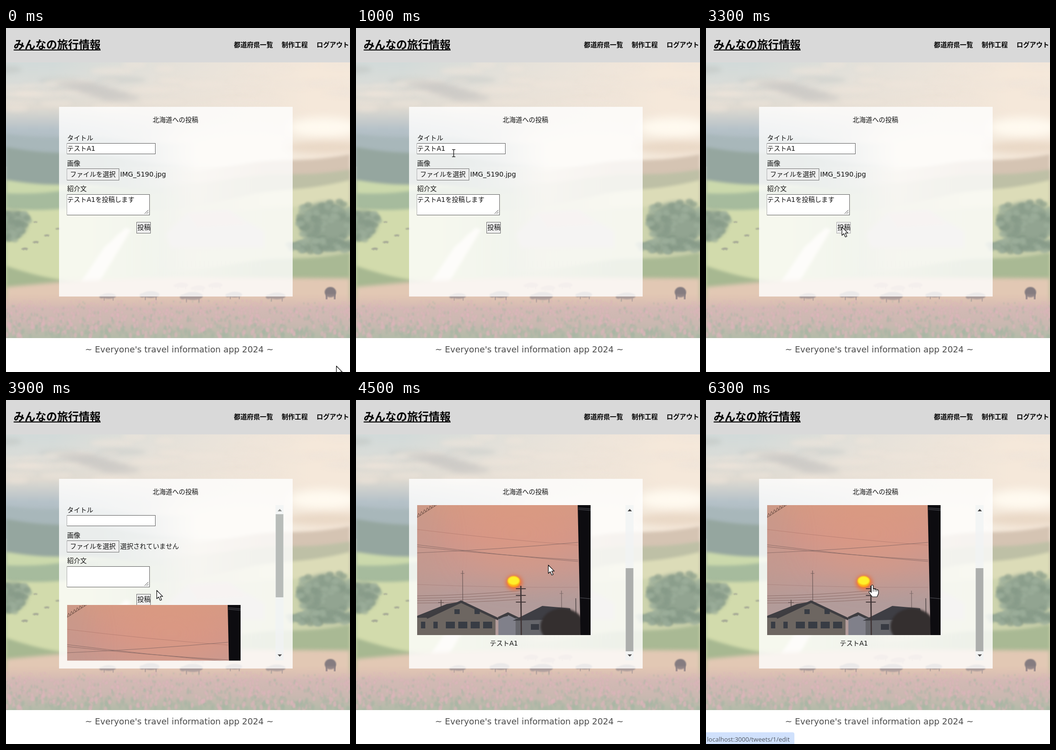
Recreate the animation shown at these times as an HTML page with a canvas. Size 720 by 720 pixels, loop 7.2 s.

```html
<!DOCTYPE html>
<html lang="ja">
<head>
<meta charset="utf-8">
<title>みんなの旅行情報</title>
<style>
html, body { margin: 0; width: 100%; height: 100%; overflow: hidden; background: #fff; }
canvas { display: block; width: 720px; height: 720px; }
</style>
</head>
<body>
<canvas id="stage" width="720" height="720"></canvas>
<script>
const LOOP = 7200, STEP = 100;
const POSTED = 3700, SCROLL_AT = 4300, SCROLL_TIME = 200, HOVER = 5000, STATUS = 6000;
const SCROLL = 209, SIZE = 13.65;
const FONT = '"DejaVu Sans", "Noto Sans CJK JP", sans-serif';
const ctx = document.getElementById('stage').getContext('2d');

function layer(w, h, paint) {
  const c = document.createElement('canvas');
  c.width = w;
  c.height = h;
  paint(c.getContext('2d'));
  return c;
}

function random(seed) {
  return () => (seed = (seed * 16807) % 2147483647) / 2147483647;
}

// Evenly spaced colours from (x0, y0) to (x1, y1)
function gradient(g, x0, y0, x1, y1, ...colors) {
  const f = g.createLinearGradient(x0, y0, x1, y1);
  colors.forEach((c, i) => f.addColorStop(i / (colors.length - 1), c));
  return f;
}

function soft(g, blur, paint) {
  g.filter = blur ? `blur(${blur}px)` : 'none';
  paint();
  g.filter = 'none';
}

function poly(g, pts, fill, blur = 0) {
  g.fillStyle = fill;
  g.beginPath();
  for (let i = 0; i < pts.length; i += 2) g.lineTo(pts[i], pts[i + 1]);
  soft(g, blur, () => g.fill());
}

function blob(g, x, y, rx, ry, fill, blur = 0) {
  g.fillStyle = fill;
  g.beginPath();
  g.ellipse(x, y, rx, ry, 0, 0, 7);
  soft(g, blur, () => g.fill());
}

function line(g, pts, color, width = 1) {
  g.strokeStyle = color;
  g.lineWidth = width;
  g.beginPath();
  for (let i = 0; i < pts.length; i += 2) g.lineTo(pts[i], pts[i + 1]);
  g.stroke();
}

function rect(g, x, y, w, h, fill) {
  g.fillStyle = fill;
  g.fillRect(x, y, w, h);
}

function text(g, s, x, y, size = SIZE, color = '#111', weight = '', font = FONT) {
  g.font = `${weight} ${size}px ${font}`;
  g.fillStyle = color;
  g.fillText(s, x, y);
}

function paintSky(g, rnd) {
  rect(g, 0, 72, 720, 230, gradient(g, 0, 72, 0, 260, '#d2dad9', '#dadcd8', '#dfdad1', '#b5c1c8', '#a9b7bb'));
  rect(g, 0, 72, 720, 230, gradient(g, 100, 0, 640, 0, '#f2e6da00', '#efe5dab0', '#f5e8da'));
  for (let i = 0; i < 45; i++) {
    const x = rnd() * 720, y = 74 + rnd() * 95;
    const tint = x < 330 && i % 3 === 0 ? '#c3c7c666' : '#f1e6da77';
    blob(g, x, y, 20 + rnd() * 40, 3 + rnd() * 6, tint, 4);
  }
  for (let i = 0; i < 5; i++) blob(g, 150 + i * 22, 118 + i * 7, 42, 8, '#c6c4c077', 5);
  blob(g, 470, 260, 150, 60, '#f7eedf', 30);
  blob(g, 665, 208, 75, 20, '#fffaf0', 10);
  blob(g, 670, 250, 90, 12, '#e9d8c6', 7);
}

// Rolling ground that fades out from one side of the stage to the middle
function ridge(g, side, y, slope, color) {
  const edge = side < 0 ? 0 : 720;
  const pts = [edge, 650];
  for (let d = 0; d <= 400; d += 20) pts.push(edge - side * d, y + slope * d + 3 * Math.sin(d / 40));
  pts.push(edge - side * 400, 650);
  poly(g, pts, gradient(g, edge - side * 180, 0, edge - side * 400, 0, color, color + '00'), 3);
}

function paintLand(g) {
  rect(g, 0, 290, 720, 260, gradient(g, 0, 290, 0, 540, '#eee5d5', '#e2e2c8', '#cfd4b2'));
  ridge(g, -1, 222, 0.05, '#a8b7ba');
  ridge(g, -1, 249, 0.1, '#95a69f');
  ridge(g, -1, 318, 0.08, '#cbd9ac');
  ridge(g, -1, 346, -0.05, '#a6bb9d');
  ridge(g, -1, 378, 0, '#d2dbac');
  ridge(g, -1, 498, 0.25, '#a7b891');
  ridge(g, 1, 264, 0.1, '#d5c4b3');
  ridge(g, 1, 296, 0.08, '#bec0a6');
  ridge(g, 1, 318, 0.16, '#dcdcb8');
  ridge(g, 1, 362, 0.1, '#cdd3ad');
  ridge(g, 1, 470, 0.1, '#a9b994');
  poly(g, [155, 535, 205, 460, 250, 418, 262, 422, 190, 540], '#f7f2e6', 3);
  poly(g, [335, 430, 380, 388, 465, 382, 540, 425, 540, 460, 345, 460], '#cfc8c5', 4);
  poly(g, [400, 418, 380, 388, 465, 382, 505, 412], '#d6c6bf', 2);
  for (let x = 325; x < 535; x += 9) line(g, [x, 488, x, 500], '#bfc2aa');
}

function tree(g, rnd, x, y, rx, ry) {
  blob(g, x, y, rx * 0.85, ry * 0.85, '#92a491', 4);
  for (let i = 0; i < rx; i++) {
    const a = rnd() * 6.3, r = Math.sqrt(rnd());
    blob(g, x + Math.cos(a) * r * rx, y + Math.sin(a) * r * ry, 8, 6, i % 2 ? '#879a88aa' : '#9cae9aaa', 2);
  }
}

function cow(g, x, y, s, color) {
  blob(g, x, y, s, s * 0.4, color, 1);
  blob(g, x - s, y + s * 0.1, s * 0.3, s * 0.25, color, 1);
  for (const leg of [-0.7, 0.55]) rect(g, x + leg * s, y, s * 0.13, s * 0.65, color);
}

function paintMeadow(g, rnd) {
  poly(g, [0, 542, 130, 530, 350, 522, 720, 524, 720, 648, 0, 648], '#e2c8b4', 4);
  for (let i = 0; i < 5; i++) cow(g, 215 + i * 88, 561 - i % 2 * 3, 15 + i % 3 * 3, '#999091');
  for (let i = 0; i < 3; i++) cow(g, 368 + i * 36, 538 + i % 2 * 6, 13, '#c9afa5');
  blob(g, 679, 553, 12, 11, '#857c80', 1);
  for (const x of [669, 686]) rect(g, x, 553, 4, 15, '#857c80');
  for (let i = 0; i < 5; i++) cow(g, 40 + i * 23 % 70, 462 - i * 14, 6 - i * 0.6, '#a5a896');
  rect(g, 0, 555, 720, 94, gradient(g, 0, 555, 0, 648, '#dcbcb000', '#d3b9b4', '#cbb8b1', '#b4bba9'));
  for (let i = 0; i < 900; i++) {
    const d = rnd(), pink = rnd() > 0.1 + d * 0.5;
    blob(g, rnd() * 720, 570 + d * 78, 1.5 + d * 2, 2 + d * 4, pink ? '#deb5bb90' : '#a6b6a370', 1);
  }
}

function paintPage(g) {
  const rnd = random(77);
  rect(g, 0, 0, 720, 720, '#fff');
  g.save();
  g.beginPath();
  g.rect(0, 72, 720, 577);
  g.clip();
  paintSky(g, rnd);
  paintLand(g);
  tree(g, rnd, 14, 410, 36, 34);
  tree(g, rnd, 670, 410, 66, 54);
  tree(g, rnd, 665, 455, 75, 14);
  paintMeadow(g, rnd);
  g.restore();
  rect(g, 0, 0, 720, 72, '#d9d9d9');
  rect(g, 111, 165, 489, 397, 'rgba(255,255,255,.8)');
  text(g, 'みんなの旅行情報', 16, 42.5, 22.75, '#000', 'bold');
  rect(g, 16, 45, 182, 2, '#000');
  text(g, '都道府県一覧', 477, 40, SIZE, '#000', 'bold');
  text(g, '制作工程', 577, 40, SIZE, '#000', 'bold');
  text(g, 'ログアウト', 650, 40, SIZE, '#000', 'bold');
  text(g, '北海道への投稿', 307, 197);
  text(g, "~ Everyone's travel information app 2024 ~", 165.5, 679, 17.8, '#4b4b4b');
}

function wire(g, y0, y1, end = 337, color = '#8d6c68') {
  g.strokeStyle = color;
  g.lineWidth = 0.9;
  g.beginPath();
  g.moveTo(0, y0);
  g.quadraticCurveTo(end / 2, (y0 + y1) / 2 + 4, end, y1);
  g.stroke();
}

// Mast with crossbars
function mast(g, x, y, bars, color, width) {
  line(g, [x, y, x + 1, 272], color, width);
  for (let i = 0; i < bars; i++) {
    const r = width * 4, h = y + 6 + i * 14;
    line(g, [x - r, h, x + r, h], color, width * 0.7);
  }
}

function gable(g, cx, peak, half, back, wall) {
  const eave = peak + half * 0.47, left = cx - half - back;
  poly(g, [left, eave, cx, peak, cx + half, eave, cx + half, 272, left, 272], wall);
  poly(g, [left, eave, cx - back, peak + 5, cx, peak, cx - half, eave], '#3f3e42');
  line(g, [cx - half, eave, cx, peak, cx + half + 6, eave + 3], '#3e3d41', 5);
}

// Sunset picture, 363 x 272
function paintPhoto(g) {
  rect(g, 0, 0, 363, 272, gradient(g, 0, 0, 0, 272, '#d69a84', '#d3978a', '#c79a92', '#b29c9b', '#b29c9b'));
  blob(g, 215, 60, 110, 90, '#e2987d66', 35);
  blob(g, 0, 90, 50, 130, '#b99a9066', 25);

  wire(g, 51, 84, 337, '#b98174');
  wire(g, 83, 118);
  wire(g, 87, 115);
  wire(g, 100, 78);
  wire(g, 166, 172, 337, '#ac8682');
  for (let i = 0; i < 4; i++) wire(g, 190 + i * 5, 179 + i * 6, 217);
  for (let x = 0; x < 42; x += 6) {
    const y = 26 - x * 0.64;
    line(g, [x, y, x + 3, y - 9, x + 6, y - 4, x, y], '#75564b');
  }

  blob(g, 203, 162, 17, 15, '#ee6b35', 4);
  blob(g, 202, 160, 13.5, 11.5, '#ffad18', 1);
  blob(g, 202, 158, 12, 9, '#fff02a', 1);

  mast(g, 95, 137, 1, '#5d4d4c', 1);
  mast(g, 302, 179, 1, '#6d5c5c', 1);
  mast(g, 50, 198, 1, '#5d4d4c', 1.5);
  mast(g, 332, 195, 0, '#554b4b', 1.5);

  gable(g, 190, 227, 20, 0, '#80808a');
  gable(g, 92, 202, 72, 30, '#6d6661');
  for (let i = 0; i < 6; i++) rect(g, 8 + i * 26, 244, i < 2 ? 9 : 19, 14, '#383c44');
  for (const x of [78, 120]) rect(g, x, 218, 11, 10, '#383c44');
  rect(g, 206, 236, 110, 36, '#66666b');
  poly(g, [200, 242, 262, 211, 320, 216, 325, 238], '#3e3e44');
  rect(g, 238, 249, 17, 12, '#383b43');
  blob(g, 304, 254, 46, 38, '#342f2f', 2);
  mast(g, 217, 169, 3, '#3f3435', 2.6);

  poly(g, [336, 0, 363, 0, 363, 272, 342, 272], '#0d0c10');
  for (const y of [6, 9, 194]) line(g, [337 + y / 45, y, 363, y + 2], '#55565d');
}

const page = layer(720, 720, paintPage);
const photo = layer(363, 272, paintPhoto);

function box(x, y, w, h, fill, border) {
  rect(ctx, x, y, w, h, fill);
  ctx.strokeStyle = border;
  ctx.lineWidth = 1;
  ctx.strokeRect(x + 0.5, y + 0.5, w - 1, h - 1);
}

function drawForm(posted, hot) {
  text(ctx, 'タイトル', 128, 235);
  box(127, 241, 186, 23, '#fff', '#626262');
  text(ctx, '画像', 128, 288);
  box(127, 294, 110, 25, '#efefef', '#767676');
  text(ctx, 'ファイルを選択', 134, 311);
  text(ctx, posted ? '選択されていません' : 'IMG_5190.jpg', 239, 311, posted ? SIZE : 14);
  text(ctx, '紹介文', 128, 341);
  box(127, 348, 174, 44, '#fff', '#626262');
  for (const d of [4, 8]) line(ctx, [298 - d, 389, 298, 389 - d], '#444');
  box(273, 406, 30, 24, '#efefef', hot ? '#b0b0b0' : '#707070');
  text(ctx, '投稿', 275, 422);
  if (posted) return;
  text(ctx, 'テストA1', 128, 257);
  text(ctx, 'テストA1を投稿します', 128, 364);
}

function drawScrollbar(top) {
  rect(ctx, 564, 220, 17, 325, 'rgba(241,243,244,.75)');
  rect(ctx, 564.5, 239 + 113 * top / SCROLL, 16, 174, top ? '#acaeac' : '#b8bcb9');
  poly(ctx, [568.5, 233, 573, 228, 577.5, 233], top ? '#444' : '#8f9290');
  poly(ctx, [568.5, 532.5, 573, 537, 577.5, 532.5], '#444');
}

// Pointer moves: start, x, y reached
const MOVE = 600;
const moves = [[300, 204, 262], [1200, 208, 307], [1800, 215, 368], [2600, 284, 416], [3700, 402, 345], [4900, 347, 387]];

function pointerAt(t) {
  let x = 691, y = 707;
  for (const [start, tx, ty] of moves) {
    const k = Math.min(1, Math.max(0, (t - start) / MOVE)), e = k * k * (3 - 2 * k);
    x += (tx - x) * e;
    y += (ty - y) * e;
  }
  return [x, y];
}

const within = (x, y, l, t, r, b) => x > l && x < r && y > t && y < b;

const ARROW = new Path2D('M.5.5V18L4.5 14.3L7.7 21.5L10.8 20.2L7.6 13.2H13Z');
const HAND = new Path2D('M-1 1.5Q1-1 3 1.5V9Q5 7 7 9.5Q9 8 10.5 10.5Q13 9.5 14 12V18L11 25H1L-5 17Q-7 14-5 13.5Q-3 13-1 16Z');

function drawPointer(x, y, t) {
  const field = t < POSTED && (within(x, y, 128, 241, 312, 265) || within(x, y, 128, 348, 301, 392));
  ctx.save();
  ctx.translate(Math.round(x), Math.round(y));
  if (field) {
    line(ctx, [0.5, -7, 0.5, 7], '#111', 1.3);
    for (const e of [-7.5, 7.5]) line(ctx, [-3, e, 4, e], '#111', 1.2);
  } else {
    const hand = t >= HOVER, shape = hand ? HAND : ARROW;
    ctx.fillStyle = '#fff';
    ctx.fill(shape);
    ctx.strokeStyle = '#111';
    ctx.lineWidth = 1.2;
    ctx.lineJoin = 'round';
    ctx.stroke(shape);
    if (hand) for (const n of [3, 7, 10.5]) line(ctx, [n, 10, n, 14], '#111');
  }
  ctx.restore();
}

function drawStatus() {
  ctx.fillStyle = '#d0e1fc';
  ctx.beginPath();
  ctx.roundRect(-5, 695.5, 190, 30, 4);
  ctx.fill();
  text(ctx, 'localhost:3000/tweets/1/edit', 2, 714.5, 13.06, '#50565f', '', '"Open Sans", sans-serif');
}

function draw(t) {
  const [x, y] = pointerAt(t);
  const posted = t >= POSTED;
  const top = Math.round(SCROLL * Math.min(1, Math.max(0, (t - SCROLL_AT) / SCROLL_TIME)));
  ctx.drawImage(page, 0, 0);
  ctx.save();
  ctx.beginPath();
  ctx.rect(127.5, 220, 454, 325.5);
  ctx.clip();
  ctx.translate(0, -top);
  drawForm(posted, within(x, y, 273, 406, 303, 430));
  if (posted) {
    ctx.drawImage(photo, 128, 429);
    text(ctx, 'テストA1', 280, 723);
  }
  ctx.restore();
  if (posted) drawScrollbar(top);
  if (t >= STATUS) drawStatus();
  drawPointer(x, y, t);
}

function tick(now) {
  draw(Math.floor((now % LOOP) / STEP) * STEP);
  requestAnimationFrame(tick);
}
requestAnimationFrame(tick);
</script>
</body>
</html>
```
